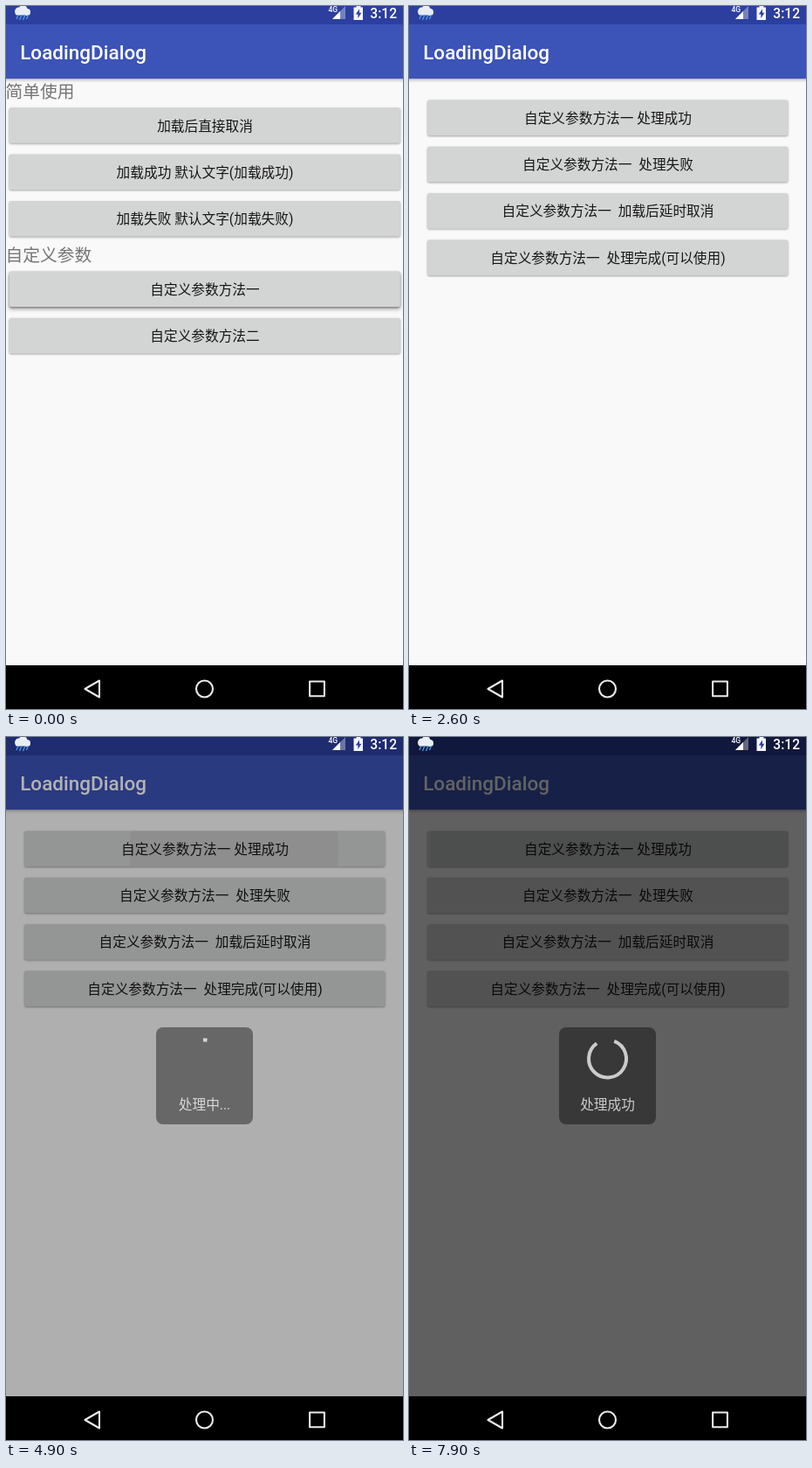
An HTML page for the animation above (8 s loop, 455x804 px).

```html
<!DOCTYPE html>
<html lang="zh-CN">
<head>
<meta charset="utf-8">
<title>LoadingDialog</title>
<style>
html, body { margin: 0; width: 100%; height: 100%; overflow: hidden; background: #f9f9f9; }
svg { display: block; width: 455px; height: 804px; }
text { font-family: Roboto, "Noto Sans CJK SC", "Noto Sans CJK", sans-serif; white-space: pre; }
.title { font-size: 22.5px; font-weight: 500; fill: #fff; }
.label { font-size: 15.68px; fill: #161616; text-anchor: middle; }
.head { font-size: 19.75px; fill: #757575; }
.rest { filter: blur(0.8px); }
.lift { filter: blur(2px); }
</style>
</head>
<body>
<svg viewBox="0 0 455 804">
  <defs>
    <linearGradient id="fall" x1="0" y1="0" x2="0" y2="1">
      <stop offset="0" stop-opacity=".3"/>
      <stop offset=".4" stop-opacity=".1"/>
      <stop offset="1" stop-opacity="0"/>
    </linearGradient>
    <clipPath id="tapClip"><rect x="21.2" y="107.5" width="413.1" height="40.5" rx="2"/></clipPath>
  </defs>
  <g id="home"></g>
  <g id="detail"></g>
  <circle id="wave" cx="261.5" cy="128" fill="#0a0500" fill-opacity=".05" clip-path="url(#tapClip)"/>
  <rect id="dim" width="455" height="804"/>
  <g id="dialog">
    <rect x="172" y="332" width="111" height="111" rx="8" fill="#000" fill-opacity=".415"/>
    <g opacity=".74">
      <path id="ring" fill="none" stroke="#fff" stroke-width="4"/>
      <path id="tick" fill="none" stroke="#fff" stroke-width="4"/>
      <text id="note" class="label" x="227.5" y="425.7" style="fill:#fff"></text>
    </g>
  </g>
  <g id="status">
    <g fill="#e9eef5">
      <circle cx="14.500" cy="6" r="4.4"/><circle cx="19.500" cy="4" r="5"/>
      <circle cx="24" cy="7" r="4"/><rect x="10.500" y="5" width="17" height="5.6" rx="2.8"/>
    </g>
    <path d="M14 10l-2 5M18 10l-2.5 6M22 10l-2.5 6M25.500 10l-2 5" stroke="#4f9be6" stroke-width="1.3"/>
    <text x="369.500" y="7" font-size="8.5" font-weight="500" fill="#fff">4G</text>
    <path d="M374 15L389 0V15z" fill="#fff" opacity=".35"/>
    <path d="M374 15L383 6V15z" fill="#fff"/>
    <path d="M398.500 1.500H401.500V0H406.500V1.500H409V16H398.500z" fill="#f4f5fa"/>
    <path d="M405 3.500L400.800 9.500H403.400V14L407.400 7.800H405z" fill="#2c3f9f"/>
    <text x="448" y="14" font-size="15.6" font-weight="500" fill="#fff" text-anchor="end">3:12</text>
  </g>
  <g fill="none" stroke="#ebebeb" stroke-width="2.1" stroke-linejoin="round">
    <path d="M90.500 781L107 771.500V790.500z"/>
    <circle cx="227.500" cy="781" r="9.500"/>
    <rect x="348.100" y="772.500" width="16.8" height="16.8"/>
  </g>
</svg>
<script>
const $ = id => document.getElementById(id);
const clamp = (v, lo = 0, hi = 1) => Math.min(hi, Math.max(lo, v));
const show = (el, on) => el.setAttribute('display', on ? 'inline' : 'none');
const set = (el, key, value) => el.setAttribute(key, value);

function button(x, y, w, label, id = '') {
  const box = `x="${x}" width="${w}" height="40.5" rx="2"`;
  const lift = id && `<rect id="${id}" class="lift" ${box} y="${y + 3}" fill-opacity=".3"/>`;
  return `${lift}<rect class="rest" ${box} y="${y + 0.9}" fill-opacity=".36"/>
    <rect ${box} y="${y}" fill="#d3d5d4"/>
    <text class="label" x="228" y="${y + 26.2}">${label}</text>`;
}

const page = body => `
  <rect width="455" height="804" fill="#f9f9f9"/>
  <rect y="83" width="455" height="5" fill="url(#fall)"/>
  <rect width="455" height="83" fill="#3c53b7"/>
  <rect width="455" height="21" fill="#2c3f9f"/>
  <text class="title" x="16.2" y="60.7">LoadingDialog</text>
  ${body}
  <rect y="754" width="455" height="50"/>`;

const wide = (y, label, id) => button(3.7, y, 448.1, label, id);
const inset = (y, label, id) => button(21.2, y, 413.1, label, id);

$('home').innerHTML = page(
  '<text class="head" x="-.5" y="104.5">简单使用</text>' +
  wide(116.3, '加载后直接取消') +
  wide(169.7, '加载成功 默认文字(加载成功)') +
  wide(223.1, '加载失败 默认文字(加载失败)') +
  '<text class="head" x="-.5" y="291.500">自定义参数</text>' +
  wide(303.5, '自定义参数方法一', 'homeLift') +
  wide(356.9, '自定义参数方法二'));

$('detail').innerHTML = page(
  inset(107.5, '自定义参数方法一 处理成功', 'tapLift') +
  inset(160.8, '自定义参数方法一  处理失败') +
  inset(214.2, '自定义参数方法一  加载后延时取消') +
  inset(267.5, '自定义参数方法一  处理完成(可以使用)'));

// Clockwise arc from angle a to angle b, in degrees
function arc(a, b) {
  b = Math.min(b, a + 359.9);
  const at = deg => {
    const r = deg * Math.PI / 180;
    return (227.5 + 21.5 * Math.cos(r)).toFixed(2) + ' ' + (368 + 21.5 * Math.sin(r)).toFixed(2);
  };
  return `M${at(a)}A21.5 21.5 0 ${b - a > 180 ? 1 : 0} 1 ${at(b)}`;
}

function tickPath(p) {
  const a = clamp(p / 0.36), b = clamp((p - 0.36) / 0.64);
  return `M216 368l${9 * a} ${9 * a}` + (b ? `l${15 * b} ${-15 * b}` : '');
}

function drawLoader(t) {
  const turn = Math.max(0, t - 5750) * 0.98 % 720;
  const tail = clamp(turn - 360, 0, 350);
  const head = clamp(turn, 0, 360);
  set($('ring'), 'd', arc(266 + tail, Math.max(head + 270, 278 + tail)));
}

function drawSuccess(t) {
  const ms = (t - 6550) % 970;
  const sweep = clamp(ms * 0.8, 0, 360);
  set($('ring'), 'd', arc(235 - sweep, 235));
  if (ms > 450) set($('tick'), 'd', tickPath((ms - 450) / 520));
  show($('tick'), ms > 450);
}

function draw(t) {
  // Page change: slide up while fading in
  const into = t - 2282;
  const slide = 64.3 * (1 - clamp(into / 330)) ** 5;
  const fade = 1 - (1 - clamp(into / 220)) ** 4;
  show($('home'), fade < 1);
  show($('detail'), into > 0);
  set($('detail'), 'transform', `translate(0 ${slide.toFixed(2)})`);
  set($('detail'), 'opacity', fade);

  set($('homeLift'), 'opacity', t < 700 ? 1 : 0);
  set($('tapLift'), 'opacity', t < 4700 ? clamp((t - 4200) / 200) : 0);

  show($('wave'), t > 4800);
  set($('wave'), 'r', 120 + 117 * clamp((t - 4900) / 500));

  set($('dim'), 'opacity', clamp((t - 4781) * 0.0025, 0, 0.61));

  const open = clamp((t - 4746) / 100);
  const scale = 0.92 + 0.08 * open;
  set($('dialog'), 'opacity', open);
  set($('dialog'), 'transform',
    `translate(227.5 387.5) scale(${scale}) translate(-227.5 -387.5)`);

  const done = t >= 6600;
  $('note').textContent = done ? '处理成功' : '处理中...';
  if (done) drawSuccess(t);
  else {
    show($('tick'), false);
    drawLoader(t);
  }
}

function loop() {
  draw(Math.floor(performance.now() % 8000 / 100) * 100);
  requestAnimationFrame(loop);
}
loop();
</script>
</body>
</html>
```
